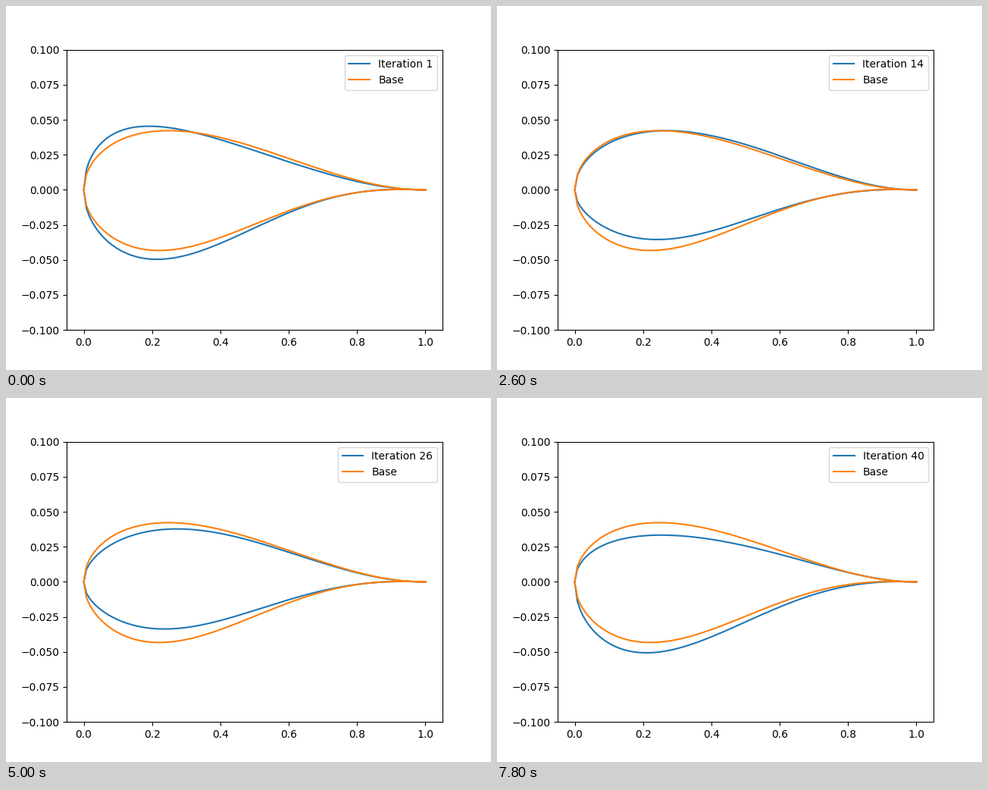
Recreate the animation shown at these times as a matplotlib script. Size 640 by 480 pixels, loop 8000 ms.

```python
import numpy as np
import matplotlib.pyplot as plt
from matplotlib.animation import FuncAnimation

STEPS = 40
INTERVAL = 200
TAIL_UP, TAIL_LOW = -.003, -.008

# Nose, middle and aft fullness of the upper, then the lower surface
BASE = np.array([.1255, .1175, .072, .126, .146, 0])
POSES = {
    1: [.166, .093, .064, .149, .163, -.005],
    9: [.131, .100, .060, .166, .155, .004],
    14: [.117, .121, .085, .092, .130, .007],
    22: [.100, .1175, .067, .088, .121, .005],
    30: [.087, .1155, .066, .104, .1205, .009],
    35: [.128, .074, .087, .145, .157, .006],
    40: [.104, .0805, .079, .160, .152, .013],
}

x = np.linspace(0, 1, 128)


def surface(nose, mid, aft, tail):
    """Round-nosed class function times a cubic Bernstein polynomial."""
    u = 1 - x
    fullness = nose * u**3 + 3 * mid * x * u**2 + 3 * aft * x**2 * u + tail * x**3
    return np.sqrt(x) * u * fullness


def outline(pose):
    upper = surface(*pose[:3], TAIL_UP)
    lower = -surface(*pose[3:], TAIL_LOW)
    return np.concatenate([upper[::-1], lower])


def pose_at(iteration):
    """Ease in from the last pose towards the next one."""
    keys = list(POSES)
    a = max(k for k in keys if k <= iteration)
    b = min(k for k in keys if k >= iteration)
    t = (iteration - a) / max(b - a, 1)
    start, end = np.array(POSES[a]), np.array(POSES[b])
    return start + (end - start) * t**3


fig, ax = plt.subplots(figsize=(6.4, 4.8), dpi=100)
outline_x = np.concatenate([x[::-1], x])
foil, = ax.plot(outline_x, outline(pose_at(1)), color="#1f77b4", label="Iteration 1")
ax.plot(outline_x, outline(BASE), color="#ff7f0e", label="Base")
ax.set_xlim(-0.05, 1.05)
ax.set_ylim(-0.1, 0.1)
legend = ax.legend(loc="upper right")


def update(i):
    foil.set_ydata(outline(pose_at(i + 1)))
    legend.get_texts()[0].set_text(f"Iteration {i + 1}")
    return foil, legend


anim = FuncAnimation(fig, update, frames=STEPS, interval=INTERVAL,
                     repeat=True, repeat_delay=0, blit=False)
plt.show()
```
